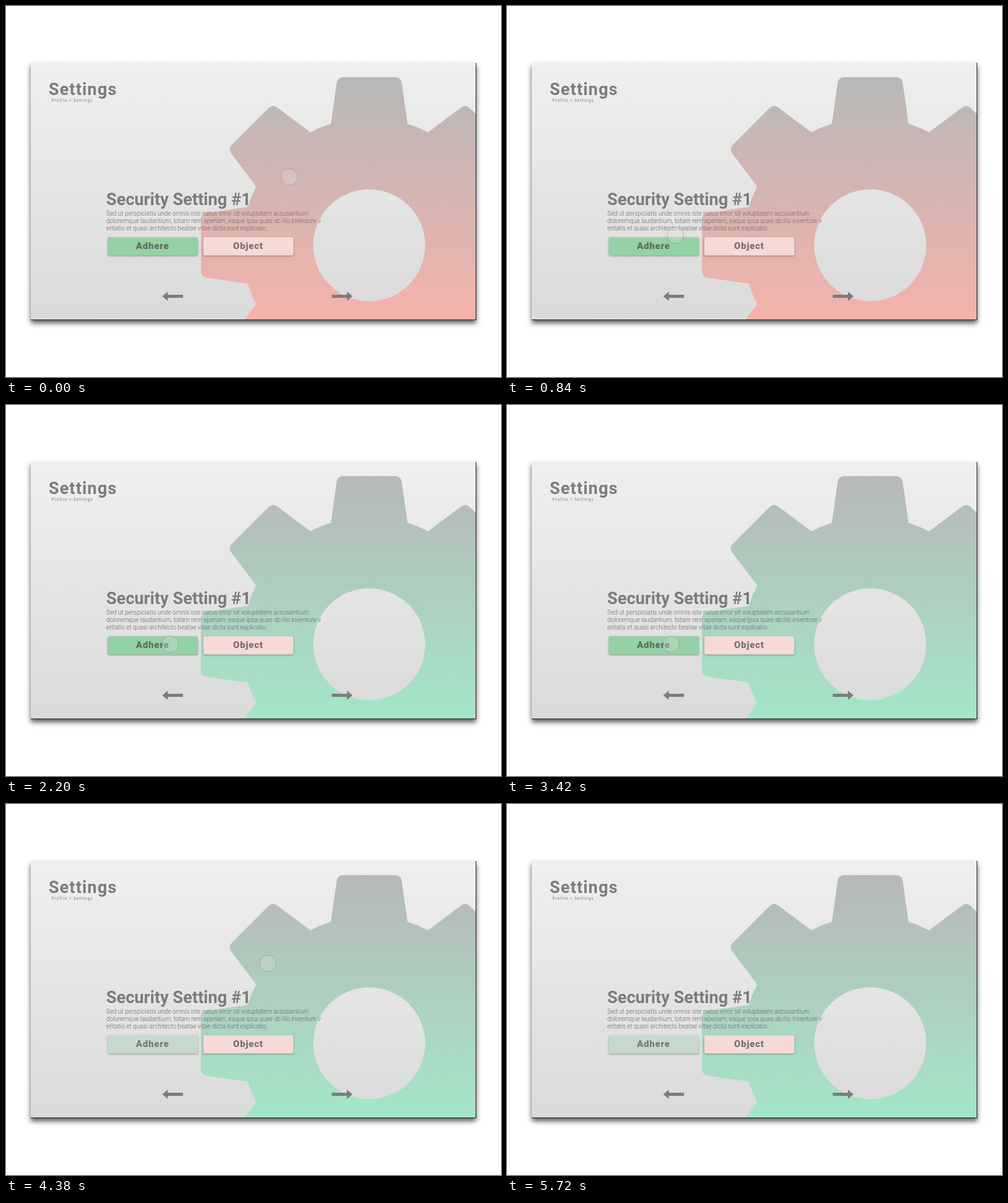
These frames come from a looping animation (800 px wide and 600 px high, 6.46 s). An HTML page with a canvas:

```html
<!DOCTYPE html>
<html lang="en">
<head>
<meta charset="utf-8">
<title>Security settings</title>
<style>
html, body { margin: 0; width: 100%; height: 100%; overflow: hidden; background: #fff; }
canvas { display: block; }
</style>
</head>
<body>
<canvas id="stage" width="800" height="600"></canvas>
<script>
const ctx = document.getElementById('stage').getContext('2d');
const LOOP = 6460, INK = '#7c7c7b';
const PRESS = 2040, APPLY = 2200;

// Pointer keyframes: time, x, y
const path = [
  [0, 458, 276], [50, 458, 276], [188, 425.5, 286], [316, 367, 308.5], [444, 318, 332.6],
  [572, 291, 351.6], [700, 277, 366], [840, 272, 371], [1060, 267.5, 382], [1350, 265.5, 387],
  [3400, 265.5, 387], [3700, 270, 382], [3880, 281, 369], [4020, 298, 350], [4060, 305, 343],
  [4260, 374, 291], [4480, 446, 243], [4785, 446, 243], [4940, 507, 197], [5420, 692, 114],
  [5720, 774, 104], [LOOP, 860, 104]
];

const clamp = v => Math.max(0, Math.min(1, v));
const mix = (a, b, k) => 'rgb(' + a.map((v, i) => Math.round(v + (b[i] - v) * k)) + ')';

function slope(i, axis) {
  const a = path[i], b = path[i + 1];
  return a && b ? (b[axis] - a[axis]) / (b[0] - a[0]) : 0;
}

function tangent(i, axis) {
  const a = slope(i - 1, axis), b = slope(i, axis);
  return a * b > 0 ? 2 * a * b / (a + b) : 0;
}

// Monotone Hermite interpolation through the keyframes
function pointer(t, axis) {
  const i = path.findIndex((p, n) => n === path.length - 2 || t < path[n + 1][0]);
  const a = path[i], b = path[i + 1], span = b[0] - a[0], u = (t - a[0]) / span, v = 1 - u;
  return a[axis] * (1 + 2 * u) * v * v + b[axis] * u * u * (3 - 2 * u)
    + span * (tangent(i, axis) * u * v * v - tangent(i + 1, axis) * u * u * v);
}

function vertical(y0, y1, top, bottom) {
  const g = ctx.createLinearGradient(0, y0, 0, y1);
  g.addColorStop(0, top);
  g.addColorStop(1, bottom);
  return g;
}

function text(str, x, y, font, spacing = 0, color = INK) {
  ctx.font = font + ' Roboto, sans-serif';
  ctx.letterSpacing = spacing + 'px';
  ctx.fillStyle = color;
  ctx.fillText(str, x, y);
}

function shadow(color, blur, dy) {
  ctx.shadowColor = color;
  ctx.shadowBlur = blur;
  ctx.shadowOffsetY = dy;
}

function gear(color) {
  const R = 206, half = Math.asin(62 / R), up = -Math.PI / 2, step = Math.PI / 4;
  ctx.save();
  ctx.translate(587, 387);
  ctx.beginPath();
  for (let i = 0; i < 8; i++) {
    ctx.lineTo(-62, -196);
    ctx.lineTo(-52.5, -263);
    ctx.quadraticCurveTo(-51, -272, -41, -272);
    ctx.lineTo(41, -272);
    ctx.quadraticCurveTo(51, -272, 52.5, -263);
    ctx.lineTo(62, -196);
    ctx.arc(0, 0, R, up + half, up + step - half);
    ctx.rotate(step);
  }
  ctx.closePath();
  ctx.moveTo(90.5, 0);
  ctx.arc(0, 0, 90.5, 0, Math.PI * 2, true);
  ctx.restore();
  ctx.fillStyle = vertical(115, 507, '#b7b8b7', color);
  ctx.fill();
}

function button(label, x, labelX, color, ink) {
  ctx.save();
  shadow('rgba(0,0,0,.35)', 3, 1);
  ctx.fillStyle = color;
  ctx.beginPath();
  ctx.roundRect(x, 374, 145.5, 29.5, 3);
  ctx.fill();
  ctx.restore();
  text(label, labelX, 393, '900 15px', 0.8, ink);
}

function arrow(tip, dir) {
  ctx.save();
  ctx.translate(tip, 469.5);
  ctx.scale(dir, 1);
  ctx.fillStyle = INK;
  ctx.fillRect(8, -2.5, 25.5, 5);
  ctx.beginPath();
  ctx.moveTo(0, 0);
  ctx.lineTo(9, -7.5);
  ctx.lineTo(9, 7.5);
  ctx.fill();
  ctx.restore();
}

function draw(t) {
  ctx.fillStyle = '#fff';
  ctx.fillRect(0, 0, 800, 600);
  ctx.save();
  shadow('rgba(0,0,0,.65)', 8, 5);
  ctx.fillStyle = '#222';
  ctx.fillRect(40, 92, 720, 416);
  ctx.restore();

  ctx.save();
  ctx.beginPath();
  ctx.rect(40, 91, 719, 416);
  ctx.clip();
  ctx.fillStyle = vertical(92, 507, '#efefee', '#dadada');
  ctx.fillRect(40, 91, 719, 416);
  gear(t < APPLY ? '#f5b2ab' : '#a3e6c7');

  text('Settings', 69, 143.5, 'bold 27px', 1.2);
  text('Profile > Settings', 73.5, 155, '6.5px', 1);
  text('Security Setting #1', 162, 322, 'bold 27.2px');
  [
    'Sed ut perspiciatis unde omnis iste natus error sit voluptatem accusantium',
    'doloremque laudantium, totam rem aperiam, eaque ipsa quae ab illo inventore v',
    'eritatis et quasi architecto beatae vitae dicta sunt explicabo.'
  ].forEach((line, i) => text(line, 162, 338.5 + 12 * i, '300 10px', 0, '#686867'));

  const fade = clamp((t - 3700) / 280);
  button('Adhere', 164.5, 210, mix([147, 209, 166], [197, 218, 204], fade),
    mix([92, 108, 97], [116, 123, 118], fade));
  button('Object', 319, 367, '#f6dad6', '#7a6f6e');
  arrow(252.5, 1);
  arrow(560, -1);

  const pressed = t >= PRESS && t < APPLY;
  ctx.beginPath();
  ctx.arc(pointer(t, 1), pointer(t, 2), 13.3, 0, Math.PI * 2);
  ctx.fillStyle = pressed ? 'rgba(232,232,230,.55)' : 'rgba(225,225,224,.3)';
  ctx.fill();
  ctx.strokeStyle = 'rgba(110,110,110,.35)';
  ctx.lineWidth = 1;
  ctx.stroke();
  ctx.restore();
}

let start;
function tick(now) {
  start ??= now;
  draw((now - start) % LOOP);
  requestAnimationFrame(tick);
}
requestAnimationFrame(tick);
</script>
</body>
</html>
```
